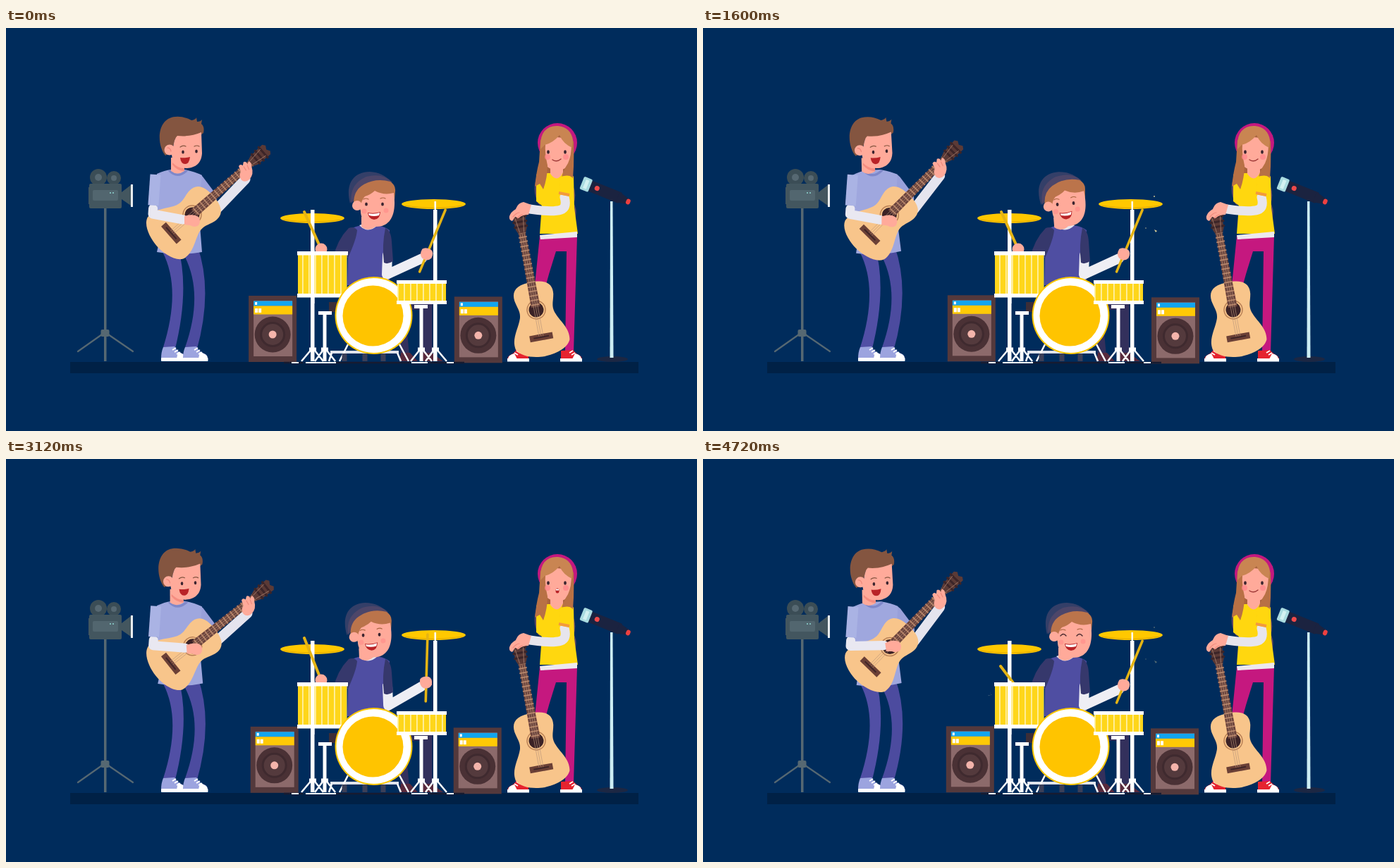
An HTML page for the animation above (4.8 s loop, 980 by 572 pixels).

```html
<!DOCTYPE html>
<html lang="en">
<head>
<meta charset="utf-8">
<title>Band on stage</title>
<style>
html, body { margin: 0; width: 100%; height: 100%; overflow: hidden; background: #002c5c; }
svg { display: block; width: 980px; height: 572px; }
.line { fill: none; stroke-linecap: round; stroke-linejoin: round; }
.skin { fill: #ffaa9a; }
.white { fill: #fff; }
.eye { fill: #3b2530; }
.wire { fill: none; stroke: #fff; }
.shut { fill: none; stroke: #4a2b30; stroke-width: 1.4; stroke-linecap: round; }
</style>
</head>
<body>
<svg viewBox="0 0 980 572">
<defs>
  <pattern id="stripes" width="9" height="10" x="413" patternUnits="userSpaceOnUse">
    <rect width="9" height="10" fill="#fed61a"/><rect x="7" width="1.8" height="10" fill="#fff0a4"/>
  </pattern>
  <pattern id="frets" width="6.5" height="14" y="-7" patternUnits="userSpaceOnUse">
    <rect y="1" width="1.6" height="12" fill="#c08a6c"/>
  </pattern>
  <g id="guitar">
    <path fill="#f8c58b" d="M40 0C40-19 34-30 18-28C7-26 2-22-8-25C-22-30-34-42-50-39C-62-34-67-14-67 0C-67 14-62 34-50 39C-34 42-22 30-8 25C2 22 7 26 18 28C34 30 40 19 40 0Z"/>
    <circle r="13" fill="none" stroke="#b98056" stroke-width="1.5"/>
    <circle r="10.5" fill="#3b2226"/>
    <rect x="-44" y="-16.500" width="9" height="33" fill="#6b4036"/>
    <rect x="-40.500" y="-11" width="2" height="22" fill="#3e2528"/>
    <path fill="#6b433c" d="M4-6.500L113-5V5L4 6.500Z"/>
    <rect x="4" y="-7" width="107" height="14" fill="url(#frets)"/>
    <path stroke="#b9967c" stroke-width=".6" d="M-38-3H112M-38 0H112M-38 3H112"/>
    <path fill="#5b3a36" d="M111-5.500L117-8L140-9L143-5L140 0L143 5L140 9L117 8L111 5.500Z"/>
    <path stroke="#3c2528" stroke-width="3" d="M120-10V10M127-10.500V10.500M134-11V11"/>
    <path stroke="#a77e6c" stroke-width=".8" d="M112-3L134-6M112 3L134 6"/>
  </g>
  <g id="speaker">
    <rect width="68" height="94" fill="#54393c"/>
    <rect x="7" y="7" width="55" height="79" fill="#8c6a6b"/>
    <rect x="7" y="7.500" width="55" height="7" fill="#12a5ef"/>
    <rect x="9" y="9" width="3" height="4" class="white"/>
    <rect x="7" y="14.500" width="55" height="12" fill="#ffc906"/>
    <path class="white" d="M9 18h4v6h-4zM14 18h4v6h-4z"/>
    <circle cx="34" cy="55" r="25.500" fill="#4a3135"/>
    <circle cx="34" cy="55" r="16.500" fill="#543a3d" stroke="#3f2a2f" stroke-width="3"/>
    <circle cx="34" cy="55" r="5.500" fill="#f4b4ab"/>
  </g>
  <g id="shoe">
    <path d="M-8-3L8-4Q12 4 21 7Q24 9 24 13H-11Q-11 4-8-3Z" fill="#9ca4df"/>
    <path class="white" d="M13 4Q24 7 24 13H11Z"/>
    <path stroke="#fff" stroke-width="2" d="M5 1L10-2M8 4L13 1M11 7L16 4"/>
    <rect x="-11" y="12" width="35.500" height="5" rx="1" class="white"/>
  </g>
  <g id="sneaker">
    <path d="M-8 0L9-1Q13 4 19 7Q22 9 22 12H-8Z" fill="#e5232f"/>
    <path class="white" d="M12 4Q21 6 21 12H8Z"/>
    <path stroke="#fff" stroke-width="1.800" d="M4 3L9 0M7 6L12 3"/>
    <rect x="-9" y="11" width="31" height="4.500" class="white"/>
  </g>
</defs>

<rect width="980" height="572" fill="#002c5c"/>
<rect x="91" y="474" width="806" height="16" fill="#002146"/>

<!-- camera -->
<g fill="#566872">
  <rect x="139" y="256" width="3.500" height="217"/>
  <rect x="134.500" y="428" width="12" height="10" rx="2"/>
  <path class="line" stroke="#566872" stroke-width="2.200" d="M136 435L102 459M145 435L180 459"/>
  <circle cx="131" cy="212" r="12" fill="#3b4d56"/><circle cx="153" cy="213" r="10" fill="#3b4d56"/>
  <circle cx="131" cy="212" r="5"/><circle cx="153" cy="213" r="4"/>
  <rect x="118" y="221" width="46" height="35" rx="2" fill="#43565f"/>
  <rect x="123" y="230" width="36" height="15" rx="2" fill="#52666f"/>
  <path fill="#43565f" d="M118 226h-1v24h1zM164 233L177 223V252L164 243Z"/>
  <circle cx="148" cy="234" r="1" fill="#8fd7d2"/><circle cx="152" cy="234" r="1" fill="#8fd7d2"/>
  <rect x="177" y="222" width="3" height="32" fill="#e8edf0"/>
</g>

<use id="spkL" href="#speaker"/>
<use id="spkR" href="#speaker"/>

<!-- guitarist -->
<path id="armR" class="line" stroke="#e5e4ee" stroke-width="14"/>
<path id="sleeveR" class="line" stroke="#98a0da" stroke-width="20"/>
<path id="legR" fill="#4c4b9f"/>
<path id="legL" fill="#514fa5"/>
<use id="footL" href="#shoe"/>
<use id="footR" href="#shoe"/>
<g id="torso">
  <path fill="#9fa7de" d="M214 207Q225 202 234 201H254Q268 204 278 209L273 255L278 318Q247 324 214 318Q221 290 214 255Z"/>
  <path fill="#7f88c9" d="M233 201Q243 212 255 201L258 203Q243 217 230 203Z"/>
</g>
<g id="head">
  <path class="skin" d="M234 184H253V203Q243 210 234 203Z"/>
  <path fill="#f58d80" d="M236 191Q245 200 253 199V203Q243 203 236 194Z"/>
  <path fill="#845540" d="M226 181C213 165 214 128 240 126Q252 125 263 131Q269 130 270 127L271 133Q276 133 278 130L277 136Q282 140 280 149L270 157H240L234 177Z"/>
  <path class="skin" d="M237 169Q239 156 243 153Q261 155 277 148L278 178C277 194 266 199 255 199C243 198 236 190 235 180Z"/>
  <circle cx="232" cy="173" r="7.500" class="skin"/>
  <path class="line" stroke="#ee8a7d" stroke-width="1.300" d="M229 170Q233 170 234 175"/>
  <g class="eye"><ellipse cx="251" cy="176" rx="1.800" ry="2.500"/><ellipse cx="270" cy="175" rx="1.800" ry="2.500"/></g>
  <path class="line" stroke="#845540" stroke-width="1.200" d="M247 169Q251 166 255 168M267 168Q271 166 274 168"/>
  <path fill="#b92327" d="M247 184Q254 185 261 183Q260 193 254 193Q248 193 247 184Z"/>
</g>
<g id="axe">
  <use href="#guitar"/>
  <path class="skin" d="M85 9Q86 1 92 0L95-8Q99-10 100-5L104-8Q108-7 106-2L110-4Q113-1 108 5Q104 15 94 16Q86 16 85 9Z"/>
  <path class="line" stroke="#ee8a7d" stroke-width="1.200" d="M100-3L99 3M105-1L103 5"/>
</g>
<path id="armL" class="line" stroke="#e9e8f1" stroke-width="13"/>
<path id="sleeveL" class="line" stroke="#aab3e4" stroke-width="15" style="stroke-linecap:butt"/>
<g id="strum"><path class="skin" d="M-11-6Q2-10 9-5Q13 1 9 7Q4 11-3 7L-11 6Z"/></g>

<!-- drummer -->
<path fill="#33305c" d="M553 380H604V462H590L586 400H566L572 465H560Z"/>
<path fill="#582a3d" d="M560 461H573L584 473H558ZM590 461H604L620 473H588Z"/>
<rect x="458" y="389" width="30" height="14" fill="#3c2e38"/>
<path fill="#4f4ea2" d="M486 286Q497 281 505 280H526Q538 282 544 287V365H484Z"/>
<path fill="#36386c" d="M486 284Q494 281 498 287Q497 300 485 326H464Q470 300 486 284Z"/>
<path fill="#e4e4ee" d="M501 280Q513 293 527 280L524 279H504Z"/>
<path id="drumArm" class="line" stroke="#eeeef4" stroke-width="14"/>
<path fill="#36386c" d="M538 284Q546 287 547 303L549 331Q541 336 536 333Q533 308 538 284Z"/>
<g id="drumHead">
  <path class="skin" d="M504 268H524V282Q513 290 504 282Z"/>
  <path fill="#343f68" d="M488 249C481 222 492 204 516 204Q535 205 547 219L540 224L497 236Z"/>
  <path fill="#54486a" d="M490 249Q486 222 511 211Q534 205 548 219L540 221Q505 218 497 240Z" opacity=".8"/>
  <path fill="#bb744b" d="M493 249Q493 231 506 223Q524 212 545 218Q553 223 552 232L551 243L503 259Z"/>
  <path class="skin" d="M503 257Q503 245 509 239Q518 236 523 231Q536 238 550 234C554 262 547 282 525 282C510 281 502 270 503 257Z"/>
  <circle cx="498" cy="252" r="7" class="skin"/>
  <g id="drumOpen" class="eye"><ellipse cx="511" cy="250" rx="1.900" ry="2.500"/><ellipse cx="534" cy="250" rx="1.900" ry="2.500"/></g>
  <path id="drumShut" class="shut" d="M507 251Q511 246 515 251M530 251Q534 246 538 251"/>
  <path class="line" stroke="#a7643f" stroke-width="1.200" d="M507 243Q510 241 514 243M531 242Q535 240 538 242"/>
  <path fill="#b92327" d="M513 262Q522 264 531 261Q530 272 522 272Q514 271 513 262Z"/>
  <path class="white" d="M514 263Q522 265 530 262L529 266Q522 268 515 266Z"/>
  <g fill="#ff8b88" opacity=".6"><circle cx="508" cy="260" r="3.500"/><circle cx="539" cy="259" r="3.500"/></g>
</g>
<path fill="#ffc800" d="M389 270a45.500 7 0 0 1 91 0a45.500 7 0 0 1-91 0M561 250a45.500 7 0 0 1 91 0a45.500 7 0 0 1-91 0"/>
<path fill="none" stroke="#e0a800" d="M393 272Q434 279 476 272M565 252Q606 259 648 252"/>

<!-- stands -->
<g class="white">
  <rect x="432" y="258" width="5.500" height="215"/><rect x="606" y="258" width="5.500" height="215"/>
  <rect x="607.500" y="246" width="2.500" height="14"/>
  <rect x="449.500" y="403" width="5" height="70"/><rect x="443" y="402" width="19" height="5"/>
  <rect x="586.500" y="393" width="5" height="80"/><rect x="579" y="393" width="19" height="5"/>
  <rect x="460" y="458" width="97" height="4" fill="#dfe3ec"/>
</g>
<path class="wire" stroke-width="2.500" d="M435 454L419 473M435 454L450 473M452 454L438 473M452 454L467 473M589 454L574 473M589 454L604 473M609 454L595 473M609 454L625 473M485 449L473 473M558 449L571 473M462 461L458 473M555 461L560 473"/>
<path class="wire" stroke-width="5" d="M430 456H440M447 456H457M584 456H594M604 456H614"/>
<path stroke="#171b30" stroke-width="2.500" d="M394 475H421M467 475H574M600 475H650"/>
<path class="wire" stroke-width="2" d="M405 475H415M425 475H468M575 475H598M625 475H635"/>
<path stroke="#3b3f58" stroke-width="7" d="M480 462V473M509 462V473M535 462V473"/>

<path id="stickL" class="line" stroke="#e5b414" stroke-width="4"/>
<circle id="handL" r="8.500" class="skin"/>
<g id="stickR">
  <path class="line" stroke="#e5b414" stroke-width="3.600" d="M0 27V-68"/>
  <path class="skin" d="M-9-4Q-6-9 3-8Q9-6 8 3Q5 10-4 8Q-10 5-9-4Z"/>
</g>
<g id="tom">
  <rect x="414" y="318" width="69.500" height="64" fill="url(#stripes)"/>
  <path class="white" d="M413 317h72v5.500h-72zM413 377h72v5.500h-72z"/>
</g>
<rect x="432" y="315" width="5.500" height="76" class="white"/>
<circle cx="521.500" cy="408" r="55" fill="#ffc800"/>
<circle cx="521.500" cy="408" r="53" class="white"/>
<circle cx="520.500" cy="408.500" r="43" fill="#ffc400"/>
<rect x="555" y="359" width="69" height="32" fill="url(#stripes)"/>
<path class="white" d="M554 358h71v5h-71zM554 387h71v5h-71z"/>
<g id="chips">
  <path fill="#b9c5dc" d="M-56 1L-33 3L-56 6ZM-34-9L-20-4L-33-5ZM-40-21L-32-18L-39-19Z"/>
  <path fill="#e3bd3b" d="M-33 3L-55 9L-56 6ZM-20-4L-33-4L-31-6Z"/>
</g>
<g id="sparks" fill="#f7e4a0"><circle cx="640" cy="239" r=".9"/><path d="M640 286L644 288L642 290Z"/><circle cx="628" cy="284" r=".7"/></g>

<!-- singer -->
<path class="line" stroke="#5d4763" stroke-width="4" d="M754 214Q748 232 757 249M802 224Q808 236 803 249Q809 258 805 272"/>
<path fill="#c5187f" d="M757 295H810L805 460H793L795 317H780Q768 354 759 390L738 461H722L750 365Z"/>
<use href="#sneaker" transform="translate(733 458) scale(-1 1)"/><use href="#sneaker" x="795" y="458"/>
<path fill="#ffd70f" d="M752 208Q765 204 773 204H790Q803 205 805 211L806 255L811 292H757L760 252L752 246Z"/>
<path fill="#ece9ee" d="M757 294L810 289V297L758 300Z"/>
<g id="girlHead">
  <circle cx="782" cy="163" r="28" fill="#c4187f"/>
  <path fill="#a8643f" d="M759 160Q762 141 782 140Q802 142 804 161L802 206H762Z"/>
  <path class="skin" d="M772 192H790V205Q782 221 772 207Z"/>
  <path class="skin" d="M761 164Q780 146 803 164V182C801 196 792 202 782 202C771 202 762 195 761 182Z"/>
  <path fill="#b87145" d="M758 158L765 166Q764 180 768 195Q768 212 762 229L757 221L750 225Q752 205 756 190ZM802 163L805 160Q806 190 804 214Q799 225 794 230L792 223L785 227Q787 206 797 192Q802 182 802 163Z"/>
  <path fill="#c98552" d="M758 172Q757 154 764 146Q771 138 783 139Q801 141 804 159L803 170Q790 164 785 152Q776 163 764 166Z"/>
  <g id="girlOpen" class="eye"><ellipse cx="769" cy="176" rx="1.900" ry="2.700"/><ellipse cx="793" cy="176" rx="1.900" ry="2.700"/></g>
  <path id="girlShut" class="shut" d="M765 175Q769 179 773 175M789 175Q793 179 797 175"/>
  <g fill="#ff878b" opacity=".75"><circle cx="768" cy="183" r="4"/><circle cx="794" cy="183" r="4"/></g>
  <path id="smile" class="line" stroke="#9d3837" stroke-width="1.500" d="M775 187Q781 191 787 186"/>
  <g id="oh"><ellipse cx="782" cy="187" rx="2.500" ry="3.500" fill="#b92327"/><path class="white" d="M780 184.500h4v2h-4z"/></g>
</g>
<use href="#guitar" transform="translate(752 400) rotate(-100.500)"/>
<path class="line" stroke="#e7e5ed" stroke-width="13" d="M792 240Q796 255 787 258Q775 262 743 257"/>
<path fill="#ffd70f" d="M786 211Q804 206 805 217L799 239L784 236Z"/>
<path stroke="#f39a3b" stroke-width="4" d="M784 234L799 237"/>
<path class="skin" d="M745 251L741 265Q732 265 727 270L722 268L718 274Q713 273 714 267Q716 261 723 257Q726 248 734 247Z"/>
<path class="line" stroke="#ee8a7d" stroke-width="1.200" d="M719 268Q724 262 728 262M725 270Q729 265 733 265"/>

<!-- microphone -->
<ellipse cx="860" cy="470" rx="22" ry="4" fill="#1c2743"/>
<path fill="#cdeef4" d="M857 246H860.500L861.500 468H856.500Z"/>
<g transform="translate(849 233) rotate(22)">
  <rect x="-23" y="-8.500" width="47" height="16" rx="2" fill="#1b2340"/>
  <path fill="#1b2340" d="M20-8L37-4V3L20 7.500Z"/>
  <rect x="-35" y="-10" width="13" height="19" rx="2" fill="#a9dbe0"/>
  <rect x="-31" y="-7" width="5" height="13" fill="#d3f1f1"/>
  <circle cx="-12" cy="-1" r="3.500" fill="#f04a4a"/>
  <rect x="33" y="-4" width="6" height="8" rx="3" fill="#ee4040"/>
</g>
</svg>
<script>
const LOOP = 4800, STEP = 80;
const $ = id => document.getElementById(id);
const set = (id, name, value) => $(id).setAttribute(name, value);
const move = (id, x, y, r = 0, px = 0, py = 0) =>
  set(id, 'transform', `translate(${x} ${y}) rotate(${r} ${px} ${py})`);
const show = (id, on) => { $(id).style.display = on ? '' : 'none'; };
const mix = (a, b, k) => a.map((v, i) => v + (b[i] - v) * k);
const line = (...pts) => 'M' + pts.map(p => p.join(' ')).join('L');

// Eased value between time/value pairs
function ease(t, ...k) {
  if (t <= k[0]) return k[1];
  for (let i = 2; i < k.length; i += 2) {
    if (t <= k[i]) {
      const u = (t - k[i - 2]) / (k[i] - k[i - 2]);
      return k[i - 1] + (k[i + 1] - k[i - 1]) * u * u * (3 - 2 * u);
    }
  }
  return k[k.length - 1];
}

// Tapered curved leg through hip, knee control point and ankle
function leg(id, hip, knee, ankle) {
  const side = (p, from, to, w) => {
    const dx = to[0] - from[0], dy = to[1] - from[1], d = Math.hypot(dx, dy);
    return [p[0] - dy / d * w, p[1] + dx / d * w];
  };
  const edge = s => [
    side(hip, hip, knee, 11.5 * s), side(knee, hip, ankle, 6 * s), side(ankle, knee, ankle, 8.5 * s)
  ];
  const [a, b, c] = edge(1), [d, e, f] = edge(-1);
  set(id, 'd', `M${a}Q${b} ${c}L${f}Q${e} ${d}Z`);
}

function guitarist(t) {
  const slow = t % 1440, beat = t % 960;
  const jump = ease(t, 160, 0, 400, .85, 560, 1.33, 640, 1, 800, .25, 920, 0);
  const hop = ease(t, 0, 0, 160, 5, 320, -14, 480, -32, 560, -34, 640, -24, 800, 2, 920, 4, 1120, 0);
  const sx = ease(slow, 0, 0, 400, 1, 560, 3, 720, 2, 1200, -.5, 1440, 0);
  const sy = hop + ease(slow, 0, 0, 560, 2, 720, 1.500, 1200, 0);
  const lean = ease(beat, 0, 0, 80, 1, 240, -2, 480, -7, 720, -10, 880, -9, 960, 0);
  const angle = ease(beat, 0, -41.300, 80, -39.400, 240, -38.500, 480, -42, 720, -46.500, 880, -46, 960, -41.300) - 6 * jump;
  const at = (x, y, jx = 0, jy = 0) => [x + sx + jx * jump, y + sy + jy * jump];

  move('head', sx + lean - 9 * jump, sy, lean * .15 - 8 * jump, 243, 203);
  move('torso', sx - 2 * jump, sy, lean * .3 - 6 * jump, 245, 262);

  const hole = at(264, 265, 5, -3), a = angle * Math.PI / 180;
  move('axe', ...hole, angle);
  const grip = [hole[0] + 90 * Math.cos(a) - 12 * Math.sin(a), hole[1] + 90 * Math.sin(a) + 12 * Math.cos(a)];
  const elbowR = at(299, 257, 2, -4);
  set('armR', 'd', line(elbowR, grip));
  set('sleeveR', 'd', line(at(271, 217, -2), at(289, 241, 1, -4)));

  const lift = ease(t % 560, 80, 0, 240, 1, 400, 0);
  const hand = [hole[0] + 5 * lift, hole[1] + 8 - 9 * lift];
  const shoulder = at(212, 208, -3, 4), elbow = at(208, 264, 0, 4);
  const cuff = mix(shoulder, elbow, .78);
  set('sleeveL', 'd', line(shoulder, cuff));
  set('armL', 'd', line(mix(shoulder, elbow, .86), elbow, [hand[0] - 13, hand[1] - 1]));
  move('strum', ...hand, -8 * lift);

  const ankleL = mix([231, 456], [172, 404], jump), ankleR = mix([262, 456], [331, 407], jump);
  leg('legL', at(233, 314, 7, 6), mix([255 + sx, 371], [242, 390], jump), ankleL);
  leg('legR', at(261, 314, 12, 0), mix([288 + sx, 374], [343, 322], jump), ankleR);
  move('footL', ...ankleL, 58 * jump);
  move('footR', ...ankleR, -12 * jump);
}

function drummer(t) {
  const beat = t % 960, hit = t % 1440;
  const tilt = ease(beat, 80, 0, 240, .5, 480, 1.050, 640, .95, 720, .5, 880, 0);
  move('drumHead', -6 * tilt, 0, -5 * tilt, 515, 283);
  show('drumShut', t >= 4640);
  show('drumOpen', t < 4640);

  const hx = ease(beat, 0, 597, 80, 600, 240, 596, 400, 597);
  const hy = ease(beat, 0, 321, 80, 306, 240, 317, 400, 321);
  move('stickR', hx, hy, ease(beat, 0, 22.600, 80, 2, 240, 1.600, 400, 22.600));
  const up = (321 - hy) / 15;
  set('drumArm', 'd', line([541, 322], [540 + 8 * up, 350], [hx - 7, hy + 6]));
  $('sparks').style.opacity = beat < 400 ? 0 : ease(beat, 400, 1, 640, .9, 720, .6, 880, .35, 960, 0);

  const tip = [
    ease(hit, 240, 423, 400, 422, 560, 417, 640, 423),
    ease(hit, 160, 261, 240, 254, 400, 294, 480, 297, 560, 283, 640, 260)
  ];
  const grip = [
    ease(hit, 240, 447, 400, 447, 560, 450, 640, 447),
    ease(hit, 240, 314, 400, 327, 560, 322, 640, 314)
  ];
  set('stickL', 'd', line(tip, mix(tip, grip, 1.050)));
  set('handL', 'cx', grip[0]);
  set('handL', 'cy', grip[1]);
  const dip = ease(hit, 400, 0, 520, 7, 560, 7, 640, 2.500, 720, 0);
  move('tom', dip * .4, dip);

  const spread = ease(hit, 400, .15, 560, .5, 640, 1, 720, 1.080, 1200, .9);
  set('chips', 'transform', `translate(413 335) scale(${spread})`);
  $('chips').style.opacity = hit < 400 ? 0 : ease(hit, 400, .4, 560, .6, 640, 1, 720, .95, 960, .2, 1120, 0);
}

function singer(t) {
  const tilt = ease(t % 800, 0, 0, 240, .18, 400, .95, 640, .95, 720, 0);
  move('girlHead', -7 * tilt, 0, -5.5 * tilt, 776, 205);
  const oh = (t >= 480 && t < 1440) || (t >= 2960 && t < 4000);
  const shut = t >= 1840 && t < 2160;
  show('oh', oh);
  show('smile', !oh);
  show('girlShut', shut);
  show('girlOpen', !shut);
}

function draw(now) {
  const n = Math.floor(now / STEP) % (LOOP / STEP), t = n * STEP;
  guitarist(t);
  drummer(t);
  singer(t);
  move('spkL', 345 + 1.800 * Math.sin(n * 2.300 - .5), 380 + .7 * Math.sin(n * 3.700));
  move('spkR', 635 + Math.sin(n * 1.900 + 1), 382 + .8 * Math.sin(n * 2.900 - 1));
}

const start = performance.now();
function frame() {
  draw(performance.now() - start);
  requestAnimationFrame(frame);
}
frame();
</script>
</body>
</html>
```
